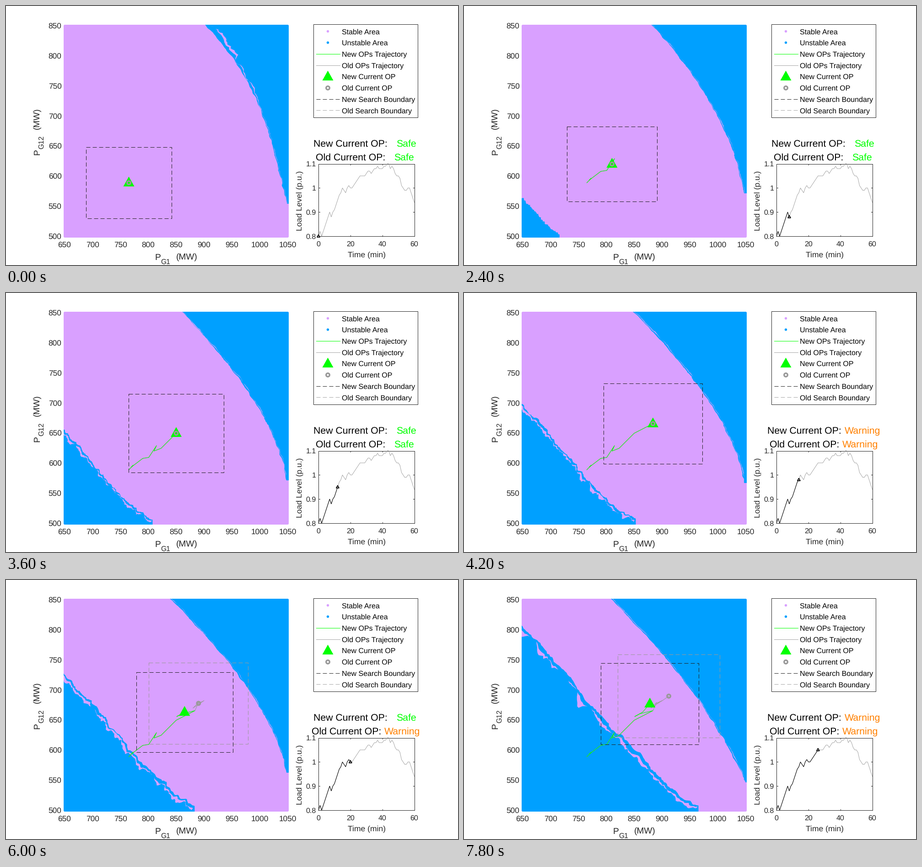
Recreate the animation shown at these times as a matplotlib script. Size 988x567 px, loop 8000 ms.

```python
import numpy as np
import matplotlib.pyplot as plt
from matplotlib.animation import FuncAnimation
from matplotlib.patches import Circle, FancyBboxPatch, Polygon, Rectangle

W, H, DPI = 988, 567, 100
PX = 72 / DPI
PINK, BLUE, GREEN, ORANGE = "#d9a0ff", "#00a0ff", "#00ff00", "#ff8000"
GRAY, LIGHT, DARK = "#999999", "#a6a6a6", "#262626"
DASH = (0, (9, 5))

plt.rcParams["font.family"] = "Liberation Sans"
plt.rcParams["text.hinting"] = "none"
fig = plt.figure(figsize=(W / DPI, H / DPI), dpi=DPI, facecolor="white")
ax = fig.add_axes([0, 0, 1, 1])
ax.set(xlim=(0, W), ylim=(H, 0))
ax.axis("off")


def through(knots, minutes):
    """Straight moves between (minute, value, ...) key points."""
    t, *columns = np.transpose(knots)
    return np.column_stack([np.interp(minutes, t, c) for c in columns])


# Load in percent, rounded to whole steps each minute
minutes = np.arange(61)
LOAD = np.floor(0.5 + through([
    (0, 80), (1, 82), (2, 80), (7, 90), (8, 88), (15, 100), (17, 98), (19, 101),
    (20, 100), (21, 100), (26, 105), (29, 105), (31, 107), (33, 106), (37, 109),
    (38, 108), (40, 108), (43, 110), (44, 110), (45, 108), (46, 109), (49, 105),
    (51, 104), (52, 101), (54, 99), (57, 100), (60, 94)], minutes)[:, 0])

# Operating points: one common path, then the two strategies part
COMMON = [(0, 268.5, 387), (1, 278, 377), (2, 274, 381), (4, 299, 362),
          (5, 312, 360), (7, 329, 334), (8, 323.5, 346), (9, 339, 340),
          (12, 372, 307), (14, 413, 286)]
NEW = through(COMMON + [(15, 392, 291), (17, 384.3, 293), (18, 373, 299),
                        (20, 390.3, 289.3), (26, 406.3, 271)], minutes[:27])
OLD = through(COMMON + [(15, 421, 268), (17, 408.6, 280.5), (19, 433, 264),
                        (20, 420.8, 270), (22, 433, 264.5), (26, 447.6, 254.2)],
              minutes[:27])


def wave(rng, n, span):
    return np.convolve(rng.normal(size=n), np.ones(span) / np.sqrt(span), "same")


def band(edge, inward, depth, width, rng):
    """Thin irregular strip running along the inside of an edge."""
    n = len(edge)
    near = np.maximum(0.5, depth * (1 + 0.35 * wave(rng, n, 5)))
    far = near + np.maximum(0, width * (1 + 0.8 * wave(rng, n, 5)))
    return np.vstack([edge + np.outer(near, inward),
                      (edge + np.outer(far, inward))[::-1]])


def upper_area(load, n=130):
    """Bowed line from the top edge to the right edge, moving left with load."""
    rng = np.random.default_rng(load)
    u = (load - 80) / 25
    top = 435 - 75 * u - 40 * u**4
    bottom = 433 - 110 * u + 120 * u**2
    y = np.linspace(40, bottom, n)
    s = (y - 41) / 405
    bow = 0.8 - 0.4 * u**6 + (-0.7 + 3 * u - 2.3 * u**2) * (s - 0.5)
    x = top + (617 - top) * (s + bow * s * (1 - s)) + 0.9 * wave(rng, n, 3)
    edge = np.column_stack([x, y])
    streak = max(0, 1 - 12 * u) * np.clip(1.3 - 3 * s, 0, 1)
    return (np.vstack([edge, [(620, bottom), (620, 40)]]),
            band(edge, (0.85, -0.5), 1.6 + 6 * streak, 0.5 + 2.5 * streak, rng))


def lower_area(load, n=130):
    """Corner region that grows out of the lower left with load."""
    rng = np.random.default_rng(load + 500)
    grow = ((load - 80) / 25) ** 1.35
    root = np.sqrt(grow)
    t = np.linspace(0, 1, n)
    top, end = 506 - 408 * grow, 506 - 14 * root
    rough = root * (1.5 * wave(rng, n, 3) + 2 * wave(rng, n, 11))
    x = 126 + 388 * grow * t + 0.7 * rough
    y = top + (end - top) * t + 200 * grow * t**2 * (1 - t) - 0.7 * rough
    edge = np.column_stack([x, y])
    return (np.vstack([edge, [(x[-1], 508), (124, 508), (124, y[0])]]),
            band(edge, (-0.6, 0.8), 6 * grow, 4.5 * grow, rng))


def text(x, y, s, size, ha="left", color=DARK, **kw):
    return ax.text(x, y, s, fontsize=size * PX, ha=ha, va="baseline",
                   color=color, **kw)


def upright(x, y, s, size):
    text(x, y, s, size, rotation=90, rotation_mode="anchor")


def line(xs, ys, color, width=1.0, **kw):
    return ax.plot(xs, ys, color=color, lw=width * PX, **kw)[0]


def triangle_at(x, y):
    return [(x, y - 13.5), (x + 12, y + 8), (x - 12, y + 8)]


def triangle(x, y, z):
    return ax.add_patch(Polygon(triangle_at(x, y), fc=GREEN, ec="none", zorder=z))


def ring(x, y, z):
    return ax.add_patch(Circle((x, y), 3.8, fill=False, ec=GRAY, lw=3.3 * PX, zorder=z))


def frame_box(x0, y0, x1, y1, **kw):
    return ax.add_patch(Rectangle((x0, y0), x1 - x0, y1 - y0, lw=PX, **kw))


# Main map
plane = ax.add_patch(FancyBboxPatch(
    (126, 41), 492, 466, boxstyle="round,pad=0,rounding_size=2.5",
    fc=PINK, ec="none", zorder=1))


def region(color, z):
    patch = ax.add_patch(Polygon([(0, 0), (1, 0), (1, 1)], fc=color, ec="none", zorder=z))
    patch.set_clip_path(plane)
    return patch


upper, lower = region(BLUE, 2), region(BLUE, 2)
upper_band, lower_band = region(PINK, 3), region(PINK, 3)

for i, v in enumerate(range(650, 1051, 50)):
    text(128 + 61 * i, 529, str(v), 17.3, "center")
for i, v in enumerate(range(500, 851, 50)):
    text(121.5, 510.7 - 65.8 * i, str(v), 17.3, "right")
text(325, 555.5, "P", 19.2)
text(338.5, 564.5, "G1", 15.5)
text(372, 555.5, "(MW)", 19.2)
upright(73, 326, "P", 19.2)
upright(82, 313, "G12", 15.5)
upright(73, 270, "(MW)", 19.2)

# Legend
frame_box(671.5, 39.5, 899.5, 243.5, fc="white", ec=DARK)
rows = 56 + 24.68 * np.arange(8)
labels = ["Stable Area", "Unstable Area", "New OPs Trajectory",
          "Old OPs Trajectory", "New Current OP", "Old Current OP",
          "New Search Boundary", "Old Search Boundary"]
for y, label in zip(rows, labels):
    text(734, y + 5.5, label, 16, color="black")
for y, color in zip(rows, (PINK, BLUE)):
    ax.add_patch(Circle((703.5, y - 0.5), 2.7, fc=color, ec="none"))
for row, color, style in ((2, GREEN, "-"), (3, LIGHT, "-"), (6, DARK, DASH), (7, LIGHT, DASH)):
    line([678, 729.5], [rows[row] - 0.4] * 2, color, ls=style)
triangle(703.5, rows[4] + 0.3, 3)
ring(703.5, rows[5], 3)

# Load curve
load_x = 683 + minutes * 3.4917
load_y = 504 - (LOAD - 80) * 5.283
line(load_x, load_y, LIGHT, zorder=3)
past = line([], [], "black", zorder=4)
pointer = ax.add_patch(Polygon([(0, 0), (1, 0), (1, 1)], fc="#b0b0b0", ec="black",
                               lw=1.6 * PX, zorder=5))
frame_box(683, 345.5, 892.5, 504, fill=False, ec=DARK)
for v in range(0, 61, 20):
    x = 683 + v * 3.4917
    text(x, 526, str(v), 16, "center")
    line([x, x], [504, 501.5], DARK)
    line([x, x], [345.5, 348], DARK)
for v in range(80, 111, 10):
    y = 504 - (v - 80) * 5.283
    text(678, y + 5.8, f"{v / 100:g}", 16, "right")
    line([683, 685.5], [y, y], DARK)
    line([892.5, 890], [y, y], DARK)
text(788, 549, "Time (min)", 17.5, "center")
upright(646.5, 491.5, "Load Level (p.u.)", 17.5)

# Moving parts
old_trail = line([], [], GRAY, zorder=5)
new_trail = line([], [], GREEN, zorder=6)
old_box = frame_box(0, 0, 1, 1, fill=False, ec=GRAY, ls=DASH, zorder=7)
new_box = frame_box(0, 0, 1, 1, fill=False, ec="#202020", ls=DASH, zorder=8)
new_mark, old_mark = triangle(0, 0, 9), ring(0, 0, 10)
new_label = text(0, 308, "New Current OP:", 21.3, color="black")
old_label = text(0, 338, "Old Current OP:", 21.3, color="black")
new_state, old_state = text(0, 308, "", 21.3), text(0, 338, "", 21.3)


def place_search_box(box, point):
    """The search area spans 90 % to 110 % of both powers."""
    p = 650 + (point[0] - 128) / 1.22
    q = 500 + (504.5 - point[1]) / 1.316
    box.set_bounds(128 + (0.9 * p - 650) * 1.22, 504.5 - (1.1 * q - 500) * 1.316,
                   0.2 * p * 1.22, 0.2 * q * 1.316)


def show_state(label, state, warning, safe_x, warning_x):
    label_x, state_x = warning_x if warning else safe_x
    label.set_x(label_x)
    state.set_x(state_x)
    state.set_text("Warning" if warning else "Safe")
    state.set_color(ORANGE if warning else GREEN)


def update(frame):
    m = frame // 3
    load = int(LOAD[m])
    for area, strip, shape in ((upper, upper_band, upper_area(load)),
                               (lower, lower_band, lower_area(load))):
        area.set_xy(shape[0])
        strip.set_xy(shape[1])
    lower.set_visible(load > 80)
    lower_band.set_visible(load > 88)

    new_trail.set_data(*NEW[:m + 1].T)
    old_trail.set_data(*OLD[:m + 1].T)
    place_search_box(new_box, NEW[m])
    place_search_box(old_box, OLD[m])
    old_box.set_visible(m > 14)
    new_mark.set_xy(triangle_at(*NEW[m]))
    old_mark.center = OLD[m]

    show_state(new_label, new_state, m == 14 or m >= 22, (671.5, 853), (663, 832))
    show_state(old_label, old_state, m >= 14, (677, 848.5), (667.5, 827))

    past.set_data(load_x[:m + 1], load_y[:m + 1])
    x, y = load_x[m], load_y[m]
    pointer.set_xy([(x, y - 3.5), (x + 3.2, y + 2.2), (x - 3.2, y + 2.2)])
    return []


anim = FuncAnimation(fig, update, frames=80, interval=100, repeat=True,
                     repeat_delay=0, blit=False)
plt.show()
```
